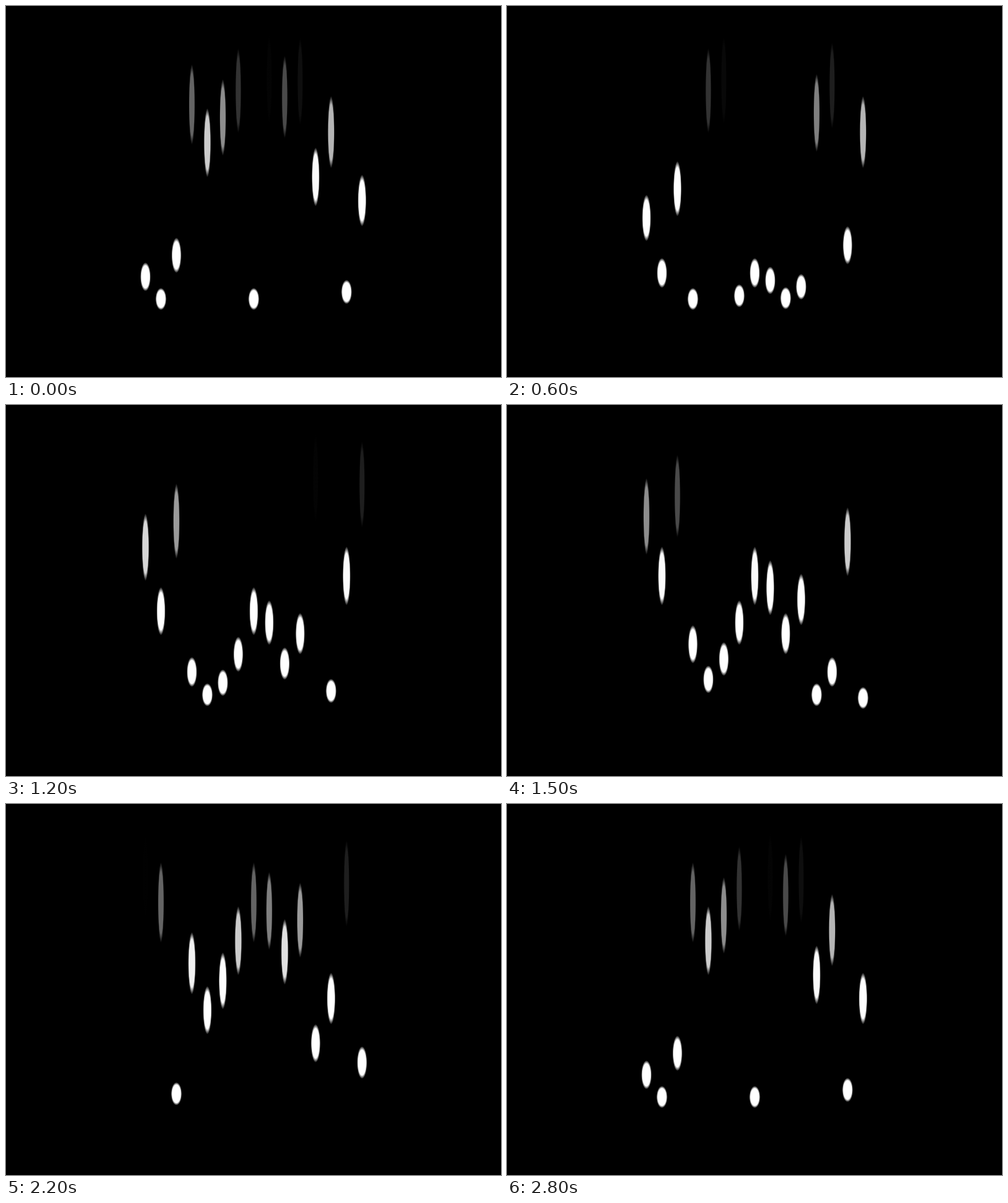
Write an HTML page with a canvas that moves like this. It is 768x576 px and loops after 2.85 s.

```html
<!DOCTYPE html>
<html lang="en">
<head>
<meta charset="utf-8">
<title>Rising drops</title>
<style>
  html, body { margin: 0; width: 100%; height: 100%; overflow: hidden; background: #000; }
  canvas { display: block; }
</style>
</head>
<body>
<canvas id="stage" width="768" height="576"></canvas>
<script>
  const ctx = document.getElementById("stage").getContext("2d");
  const STEP = 50;      // ms per step
  const LOOP = 57;      // steps per loop; the last repeats the first
  const LIFE = 56;      // steps from bottom to top
  const RADIUS = 8.6;

  // Age of each drop, left to right, when the loop begins
  const ages = [11, 0, 16, 44, 36, 41, 48, 0, 54, 46, 52, 30, 38, 6, 26];

  const smooth = p => p * p * (3 - 2 * p);
  const mix = (a, b, p) => a + (b - a) * p;

  const glow = ctx.createRadialGradient(0, 0, 0, 0, 0, RADIUS);
  glow.addColorStop(0, "#fff");
  glow.addColorStop(0.77, "#fff");
  glow.addColorStop(1, "rgba(255,255,255,0)");
  ctx.fillStyle = glow;

  function drawDrop(x, life) {
    const rise = smooth(life);
    ctx.save();
    ctx.globalAlpha = 1 - smooth(Math.max(0, life * 2 - 1));
    ctx.translate(x, mix(454.9, 112.5, rise));
    ctx.scale(mix(1, 0.5, rise), mix(2, 8, rise));
    ctx.beginPath();
    ctx.arc(0, 0, RADIUS, 0, Math.PI * 2);
    ctx.fill();
    ctx.restore();
  }

  function draw(time) {
    const step = Math.floor(time / STEP) % LOOP;
    ctx.clearRect(0, 0, 768, 576);
    ages.forEach((age, i) => drawDrop(216.4 + i * 24, (age + step) % LIFE / LIFE));
  }

  const start = performance.now();
  function tick() {
    draw(performance.now() - start);
    requestAnimationFrame(tick);
  }
  tick();
</script>
</body>
</html>
```
